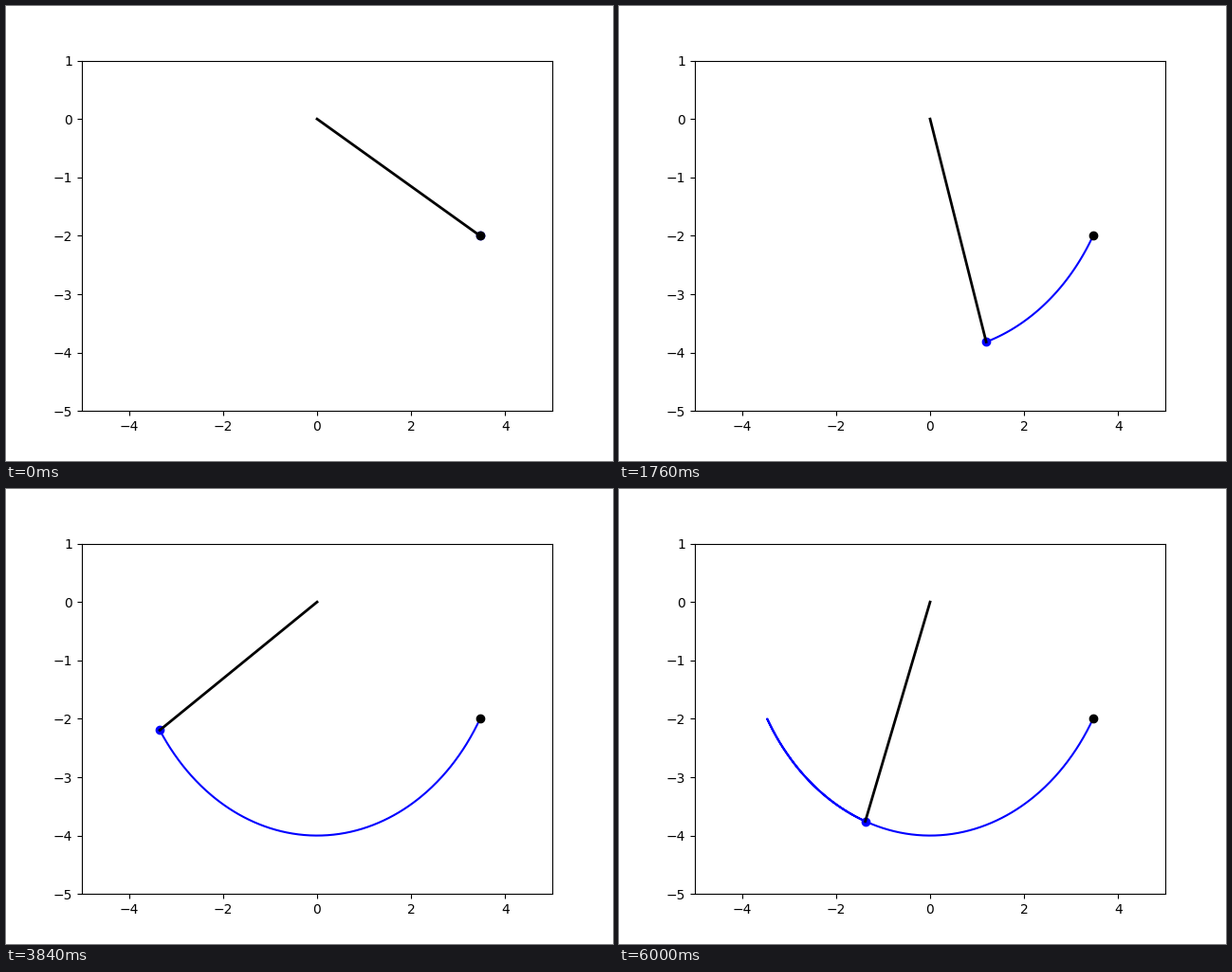
Recreate the animation shown at these times as a matplotlib script. Size 640 by 480 pixels, loop 6020 ms.

```python
import numpy as np
import matplotlib.pyplot as plt
from matplotlib.animation import FuncAnimation

G, LENGTH = 9.81, 4.0
DT, FRAMES = 0.01, 301


def slope(state):
    angle, speed = state
    return np.array([speed, -G / LENGTH * np.sin(angle)])


def rk4(state, h):
    k1 = slope(state)
    k2 = slope(state + h / 2 * k1)
    k3 = slope(state + h / 2 * k2)
    k4 = slope(state + h * k3)
    return state + h / 6 * (k1 + 2 * k2 + 2 * k3 + k4)


states = [np.array([np.pi / 3, 0.0])]
for _ in range(FRAMES - 1):
    states.append(rk4(states[-1], DT))
angles = np.array(states)[:, 0]
x, y = LENGTH * np.sin(angles), -LENGTH * np.cos(angles)

fig, ax = plt.subplots(figsize=(6.4, 4.8), dpi=100)
ax.set_xlim(-5, 5)
ax.set_ylim(-5, 1)

trail, = ax.plot([], [], "b-", lw=1.5)
bob, = ax.plot([], [], "bo", ms=6)
rod, = ax.plot([], [], "k-", lw=2)
ax.plot(x[:1], y[:1], "ko", ms=6)  # release point


def update(i):
    trail.set_data(x[:i + 1], y[:i + 1])
    bob.set_data([x[i]], [y[i]])
    rod.set_data([0, x[i]], [0, y[i]])
    return trail, bob, rod


anim = FuncAnimation(fig, update, frames=FRAMES, interval=20,
                     repeat=True, repeat_delay=0)
plt.show()
```
